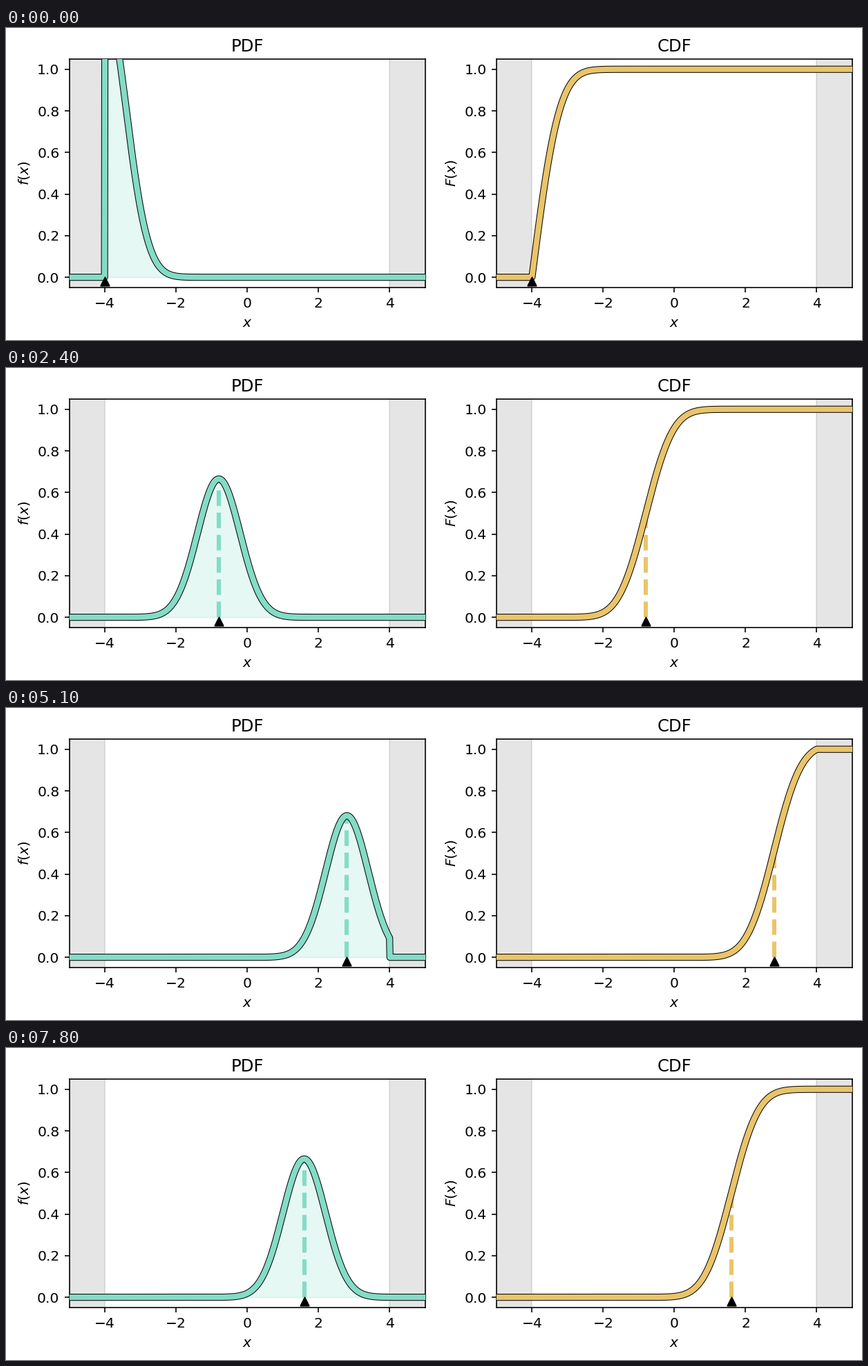
Recreate the animation shown at these times as a matplotlib script. Size 1239 by 452 pixels, loop 8 s.

```python
import math

import matplotlib.pyplot as plt
import matplotlib.patheffects as pe
import numpy as np
from matplotlib.animation import FuncAnimation

W, H, DPI = 1239, 452, 146
LO, HI, SIGMA = -4, 4, 0.6
TEAL, GOLD = "#84dcc6", "#e9c46a"
TICK_MS, LOOP_MS, HOLD = 100, 8000, 3
SWEEP = 20  # steps from one bound to the other

plt.rcParams.update({"font.family": "DejaVu Sans", "font.size": 10})

x = np.linspace(-5, 5, 1000)
phi = np.vectorize(lambda z: 0.5 * (1 + math.erf(z / math.sqrt(2))))


def pdf(v, mu):
    """Density of the normal distribution truncated to [LO, HI]."""
    mass = phi((HI - mu) / SIGMA) - phi((LO - mu) / SIGMA)
    bell = np.exp(-0.5 * ((v - mu) / SIGMA) ** 2) / (SIGMA * math.sqrt(2 * math.pi))
    return np.where((v >= LO) & (v <= HI), bell / mass, 0)


def cdf(v, mu):
    low = phi((LO - mu) / SIGMA)
    mass = phi((HI - mu) / SIGMA) - low
    return np.clip((phi((v - mu) / SIGMA) - low) / mass, 0, 1)


class Panel:
    def __init__(self, left, title, ylabel, func, color, filled=False):
        width, top, height = 515.2, 44.7, 331.5
        self.ax = ax = fig.add_axes(
            [left / W, 1 - (top + height) / H, width / W, height / H])
        self.func, self.color, self.filled = func, color, filled
        self.area = None
        ax.set(xlim=(-5, 5), ylim=(-0.05, 1.05), xlabel="$x$", ylabel=ylabel)
        ax.set_title(title, fontsize=12, pad=5.2)
        ax.set_xticks(range(-4, 5, 2))
        ax.set_yticks(np.linspace(0, 1, 6))
        for a, b in ((-5, LO), (HI, 5)):
            ax.axvspan(a, b, color="gray", alpha=0.2)
        self.stem, = ax.plot([], [], "--", color=color, lw=3, zorder=2)
        self.curve, = ax.plot([], [], color=color, lw=4, zorder=3, path_effects=[
            pe.Stroke(linewidth=5, foreground="black"), pe.Normal()])
        self.mark = ax.scatter([0], [0], s=36, marker="^", color="black",
                               lw=1, zorder=4)

    def update(self, mu):
        y = self.func(x, mu)
        self.curve.set_data(x, y)
        self.stem.set_data([mu, mu], [0, float(self.func(mu, mu))])
        self.mark.set_offsets([[mu, -0.018]])
        if self.filled:
            if self.area:
                self.area.remove()
            self.area = self.ax.fill_between(x, y, color=self.color, alpha=0.2)


def draw(frame):
    step = frame // HOLD
    mu = HI - (HI - LO) * abs(step - SWEEP) / SWEEP
    for panel in panels:
        panel.update(mu)
    return []


fig = plt.figure(figsize=((W + 1e-6) / DPI, (H + 1e-6) / DPI), dpi=DPI,
                 facecolor="white")
panels = [
    Panel(91.6, "PDF", "$f(x)$", pdf, TEAL, filled=True),
    Panel(709.8, "CDF", "$F(x)$", cdf, GOLD),
]

anim = FuncAnimation(fig, draw, frames=LOOP_MS // TICK_MS, interval=TICK_MS,
                     init_func=lambda: draw(0), repeat=True, repeat_delay=0)
plt.show()
```
